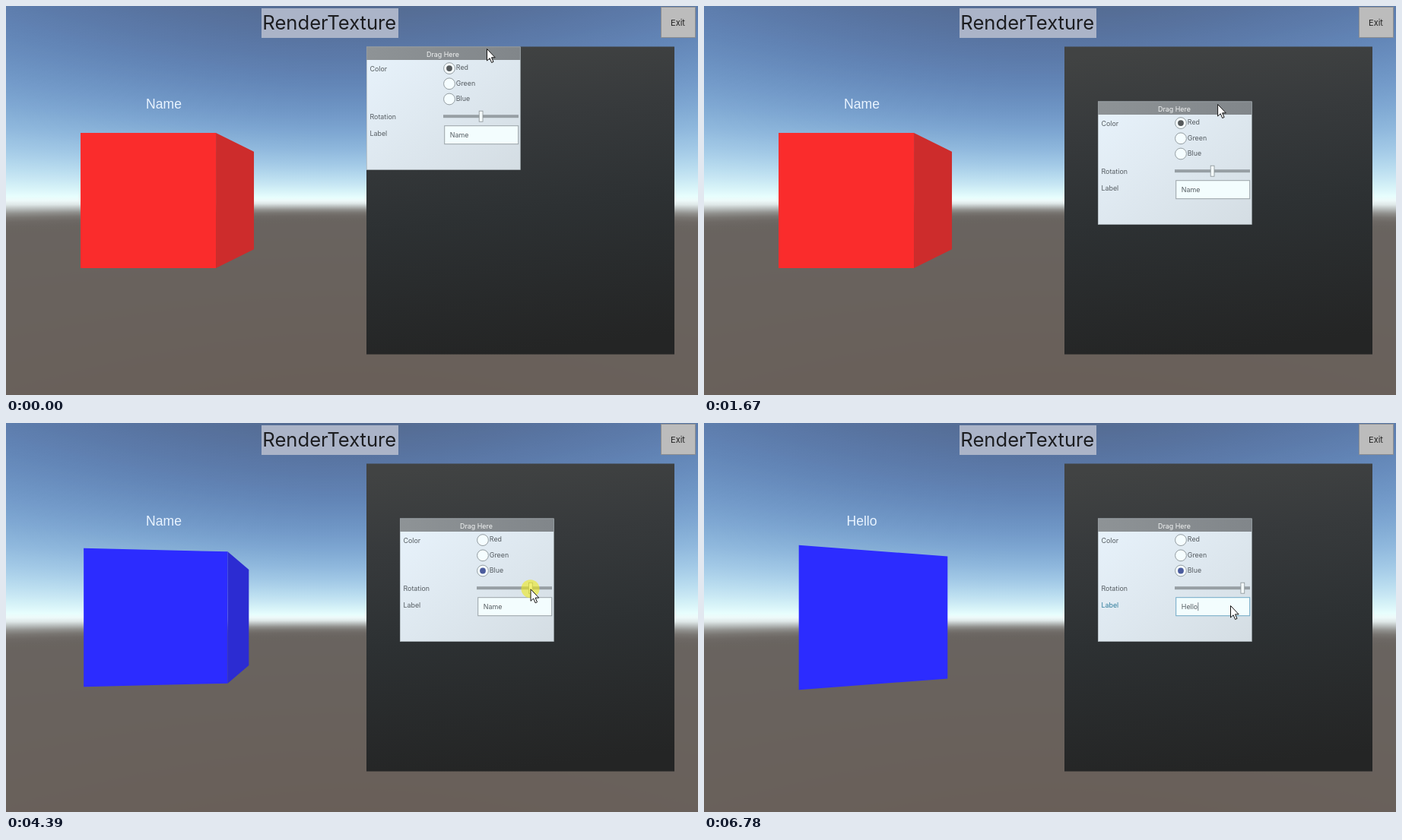
Recreate the animation shown at these times as an HTML page with a canvas. Size 910 px wide and 512 px high, loop 6.91 s.

```html
<!DOCTYPE html>
<html lang="en">
<head>
<meta charset="utf-8">
<title>Render texture panel</title>
<style>
  html, body { margin: 0; width: 100%; height: 100%; overflow: hidden; background: #695f59; }
  canvas, svg { position: absolute; left: 0; top: 0; display: block; }
  text { font-family: Inter, "Open Sans", sans-serif; }
  #panel text { font-size: 8.9px; fill: #555c61; }
  #panel .title { fill: #f2f4f4; }
  #caption { font: 17.6px "Liberation Sans", Arial, sans-serif; fill: #e9f4ff; }
</style>
</head>
<body>
<canvas id="sky" width="910" height="512"></canvas>
<svg width="910" height="512" viewBox="0 0 910 512">
  <defs>
    <linearGradient id="screen" x1=".3" y1="0" x2=".42" y2="1">
      <stop offset="0" stop-color="#414343"/>
      <stop offset=".25" stop-color="#373a3c"/>
      <stop offset=".55" stop-color="#2d3133"/>
      <stop offset="1" stop-color="#242525"/>
    </linearGradient>
    <linearGradient id="glass" x1="0" y1="0" x2="1" y2="1">
      <stop offset="0" stop-color="#e8f3fc"/>
      <stop offset="1" stop-color="#d4dde3"/>
    </linearGradient>
    <linearGradient id="bar">
      <stop offset="0" stop-color="#8e9396"/>
      <stop offset="1" stop-color="#81868a"/>
    </linearGradient>
  </defs>

  <g id="cube"></g>
  <text id="caption" x="207.5" y="134.5" text-anchor="middle"></text>

  <rect x="336" y="3" width="180" height="39" fill="#abb4c8"/>
  <text x="425.3" y="31" font-size="25.6" text-anchor="middle" fill="#1c1d20">RenderTexture</text>
  <rect x="861.5" y="1.5" width="45" height="40" fill="#bcbcbc" stroke="#8b8d90"/>
  <text x="883.5" y="25.5" font-size="11" text-anchor="middle" fill="#222">Exit</text>

  <rect x="474" y="53.5" width="405" height="405" fill="url(#screen)"/>

  <g id="panel">
    <rect width="202.5" height="162" fill="url(#glass)"/>
    <rect width="202.5" height="17.3" fill="url(#bar)"/>
    <rect x=".25" y=".25" width="202" height="161.5" fill="none" stroke="#9aa2a7" stroke-width=".6"/>
    <text class="title" x="100.5" y="13.4" text-anchor="middle">Drag Here</text>
    <text x="4.5" y="31.9">Color</text>
    <g id="radios"></g>
    <text x="4.5" y="95.2">Rotation</text>
    <rect x="101" y="89.5" width="99" height="4" fill="#979fa4"/>
    <rect id="handle" x="148.2" y="84.5" width="4.8" height="14" fill="#f4fafb" stroke="#899195" stroke-width=".8"/>
    <text id="label" x="4.5" y="117.4">Label</text>
    <rect id="field" x="102.7" y="104" width="97" height="24" fill="#f3fdfe"/>
    <rect id="selection" x="109.6" y="110" width="25" height="11.5" fill="#a9cbee"/>
    <text id="value" x="109.8" y="119"></text>
    <line id="caret" y1="110.5" y2="121.5" stroke="#59616a" stroke-width=".8"/>
  </g>

  <circle id="press" r="12" fill-opacity=".6"/>
  <path id="cursor" d="M.5 .5V16L4.1 12.7L6.6 18.5L9 17.4L6.5 11.8H11.2Z"
    fill="#fff" stroke="#111" stroke-width="1"/>
</svg>
<script>
const LOOP = 6910, POSE = 70;
const $ = id => document.getElementById(id);
const set = (node, attrs) => { for (const k in attrs) node.setAttribute(k, attrs[k]); };
const show = (node, visible) => set(node, { display: visible ? 'inline' : 'none' });
const clamp = (v, low, high) => Math.max(low, Math.min(high, v));
const add = (parent, tag, attrs) => {
  const node = document.createElementNS('http://www.w3.org/2000/svg', tag);
  set(node, attrs);
  return parent.appendChild(node);
};

const drag = { down: 210, up: 1530 };
const green = { down: 2100, up: 2310 };
const blue = { down: 2940, up: 3080 };
const slider = { down: 3640, start: 3850, end: 4760, up: 4830 };
const field = { down: 5180, up: 5320, type: 6090, perKey: 150 };

// The pointer goes straight from one of these points to the next.
const pointerPath = [
  { t: drag.down, x: 632, y: 56 },
  { t: 420, x: 800, y: 194 },
  { t: 560, x: 719, y: 145 },
  { t: 840, x: 758, y: 162 },
  { t: 1050, x: 745, y: 83 },
  { t: 1120, x: 741, y: 81 },
  { t: 1460, x: 676, y: 128 },
  { t: 1600, x: 676, y: 128 },
  { t: green.down, x: 632, y: 179 },
  { t: green.up, x: 632, y: 179 },
  { t: 2450, x: 648, y: 191 },
  { t: blue.up, x: 648, y: 191 },
  { t: 3290, x: 668, y: 214 },
  { t: slider.start, x: 668, y: 214 },
  { t: slider.end, x: 708, y: 222 },
  { t: slider.up, x: 708, y: 222 },
  { t: 5040, x: 692, y: 240 }
];

function pointerAt(t) {
  const next = pointerPath.findIndex(p => p.t > t);
  if (next < 0) return pointerPath[pointerPath.length - 1];
  if (next === 0) return pointerPath[0];
  const a = pointerPath[next - 1], b = pointerPath[next];
  const u = (t - a.t) / (b.t - a.t);
  return { x: a.x + (b.x - a.x) * u, y: a.y + (b.y - a.y) * u };
}

const colors = [
  { name: 'Red', level: 250, dot: '#55595b', from: 0 },
  { name: 'Green', level: 262, dot: '#528a67', from: green.down + POSE },
  { name: 'Blue', level: 270, dot: '#4b5c9d', from: blue.down + POSE }
];

// Sky above the horizon, haze fading into ground below it.
function shade(rise) {
  const fall = Math.exp(-((rise / 11) ** 2));
  const rgb = rise > 0
    ? [80 + 160 * Math.exp(-rise / 72), 90 + 170 * Math.exp(-rise / 113), 255 * Math.exp(-rise / 460)]
    : [105 + 133 * fall, 100 + rise * 0.02 + 150 * fall, 96 + rise * 0.03 + 154 * fall];
  return `rgb(${rgb.map(Math.round)})`;
}

// Colours follow elevation, so the bands spread towards the sides.
function paintSky() {
  const ctx = $('sky').getContext('2d');
  for (let x = 0; x < 910; x += 2) {
    const reach = 256 * Math.hypot(1, (x - 455) / 443);
    const gradient = ctx.createLinearGradient(0, 256 - reach, 0, 256 + reach);
    for (let y = 0; y <= 512; y += 4) gradient.addColorStop(y / 512, shade(256 - y));
    ctx.fillStyle = gradient;
    ctx.fillRect(x, 0, 2, 512);
  }
}

const faces = [0, 1, 2, 3].map(() => add($('cube'), 'polygon', {}));
const dots = colors.map((color, i) => {
  const cy = 28.4 + i * 20.2;
  add($('radios'), 'circle', { cx: 109, cy, r: 7.4, fill: '#f5fdff', stroke: '#8b9398', 'stroke-width': 0.9 });
  add($('radios'), 'text', { x: 117.8, y: cy + 2.4 }).textContent = color.name;
  return add($('radios'), 'circle', { cx: 109, cy, r: 3.9, fill: color.dot });
});

function drawCube(degrees, channel) {
  const rad = Math.PI / 180;
  const corner = i => {
    const a = (degrees - 135 + 90 * i) * rad;
    const h = 459.2 / (6.16 + Math.SQRT2 * Math.sin(a));
    return { x: 455 + (Math.SQRT2 * Math.cos(a) - 3.011) * h, h };
  };
  faces.forEach((face, i) => {
    const a = corner(i), b = corner(i + 1);
    const light = Math.max(0, Math.cos((degrees - 30 + 90 * i) * rad));
    const rgb = [44, 44, 44];
    rgb[channel] = Math.min(255, Math.round(colors[channel].level + (light - 0.866) * 123));
    set(face, {
      points: [a.x, 256 - a.h, b.x, 256 - b.h, b.x, 256 + b.h, a.x, 256 + a.h].join(' '),
      fill: `rgb(${rgb})`
    });
    show(face, a.x < b.x);
  });
}

function draw(time) {
  const t = Math.floor(time / POSE) * POSE;
  const tip = pointerAt(t);
  const chosen = colors.filter(color => color.from <= t).length - 1;
  const slide = t < slider.start ? 0 : pointerAt(Math.min(t, slider.up)).x - 668.25;
  const focused = t >= field.down;
  const typing = t >= field.type;
  const text = typing ? 'Hello'.slice(0, 1 + Math.floor((t - field.type) / field.perKey)) : 'Name';

  // The panel trails the pointer by one pose.
  const grip = pointerAt(clamp(t - POSE, drag.down, drag.up));
  set($('panel'), { transform: `translate(${grip.x - 158} ${grip.y - 2.3})` });

  drawCube(-slide * 360 / 93, chosen);
  dots.forEach((dot, i) => show(dot, i === chosen));
  set($('handle'), { transform: `translate(${slide})` });

  $('caption').textContent = $('value').textContent = text;
  $('label').style.fill = focused ? '#317d9c' : '';
  set($('field'), { stroke: focused ? '#70a9c6' : '#99a2a7' });
  show($('selection'), t >= field.up && !typing);
  const caretX = 110.4 + $('value').getComputedTextLength();
  set($('caret'), { x1: caretX, x2: caretX });
  show($('caret'), typing);

  set($('press'), { cx: tip.x, cy: tip.y, fill: t < 700 ? '#eceef2' : '#eeea1c' });
  show($('press'), [drag, green, blue, slider, field].some(p => t >= p.down && t < p.up));
  set($('cursor'), { transform: `translate(${tip.x} ${tip.y})` });
}

paintSky();
const begin = performance.now();
function tick() {
  draw((performance.now() - begin) % LOOP);
  requestAnimationFrame(tick);
}
tick();
</script>
</body>
</html>
```
